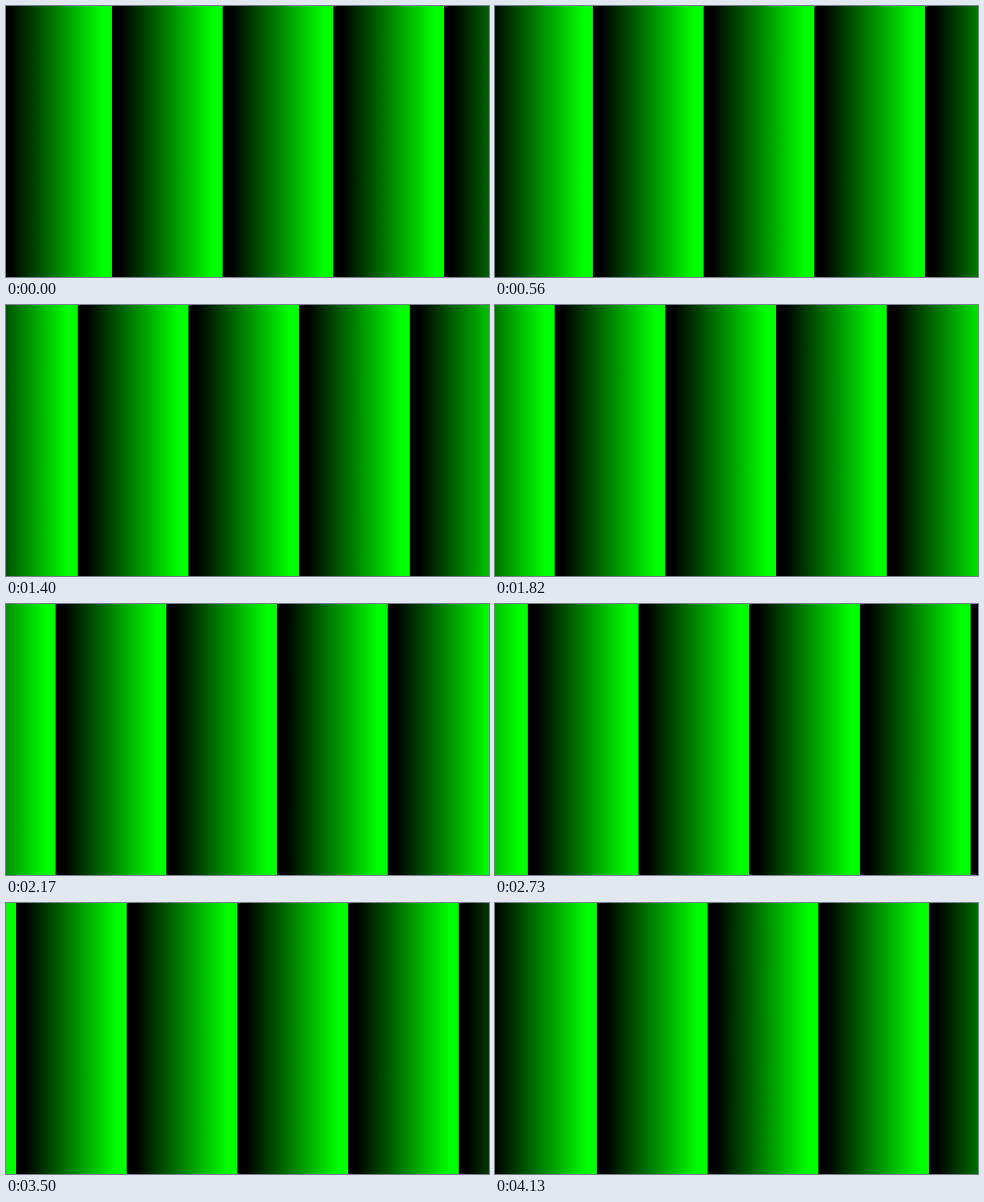
Recreate the animation shown at these times as an HTML page. Size 720 px wide and 405 px high, loop 4200 ms.

```html
<!DOCTYPE html>
<html lang="en">
<head>
<meta charset="utf-8">
<title>Green sawtooth bands</title>
<style>
  html, body { margin: 0; width: 100%; height: 100%; overflow: hidden; background: #000; }
  svg { display: block; width: 100vw; height: 100vh; }
</style>
</head>
<body>
<svg viewBox="0 0 720 405" preserveAspectRatio="none">
  <defs>
    <linearGradient id="bands" gradientUnits="userSpaceOnUse" spreadMethod="repeat" x1="0" y1="0" x2="165" y2="0">
      <stop offset="0" stop-color="#000"/>
      <stop offset="0.08" stop-color="#000"/>
      <stop offset="0.915" stop-color="#0f0"/>
      <stop offset="1" stop-color="#0f0"/>
    </linearGradient>
  </defs>
  <rect width="720" height="405" fill="url(#bands)"/>
</svg>
<script>
  const LOOP = 4200, STEP = 70, PERIOD = 165, START = 158;
  const RAMP_TIME = 560, RAMP_SHIFT = 12;
  // [time, edge position] of the steady drift
  const drift = [[560, 146], [1400, 107], [2170, 73.7], [2730, 49], [3500, 15], [4130, -13.3]];
  const bands = document.getElementById('bands');

  function edgeAt(t) {
    if (t < 2 * STEP) return START;
    if (t < RAMP_TIME) return START - RAMP_SHIFT * (t / RAMP_TIME) ** 2;
    const next = Math.max(1, drift.findIndex(([time]) => time >= t));
    const [t0, x0] = drift[next - 1], [t1, x1] = drift[next];
    return x0 + (x1 - x0) * (t - t0) / (t1 - t0);
  }

  function render(ms) {
    const t = Math.floor((ms % LOOP) / STEP) * STEP;
    const x = edgeAt(t);
    bands.setAttribute('x1', x);
    bands.setAttribute('x2', x + PERIOD);
  }

  let origin;
  function tick(now) {
    origin ??= now;
    render(now - origin);
    requestAnimationFrame(tick);
  }
  render(0);
  requestAnimationFrame(tick);
</script>
</body>
</html>
```
